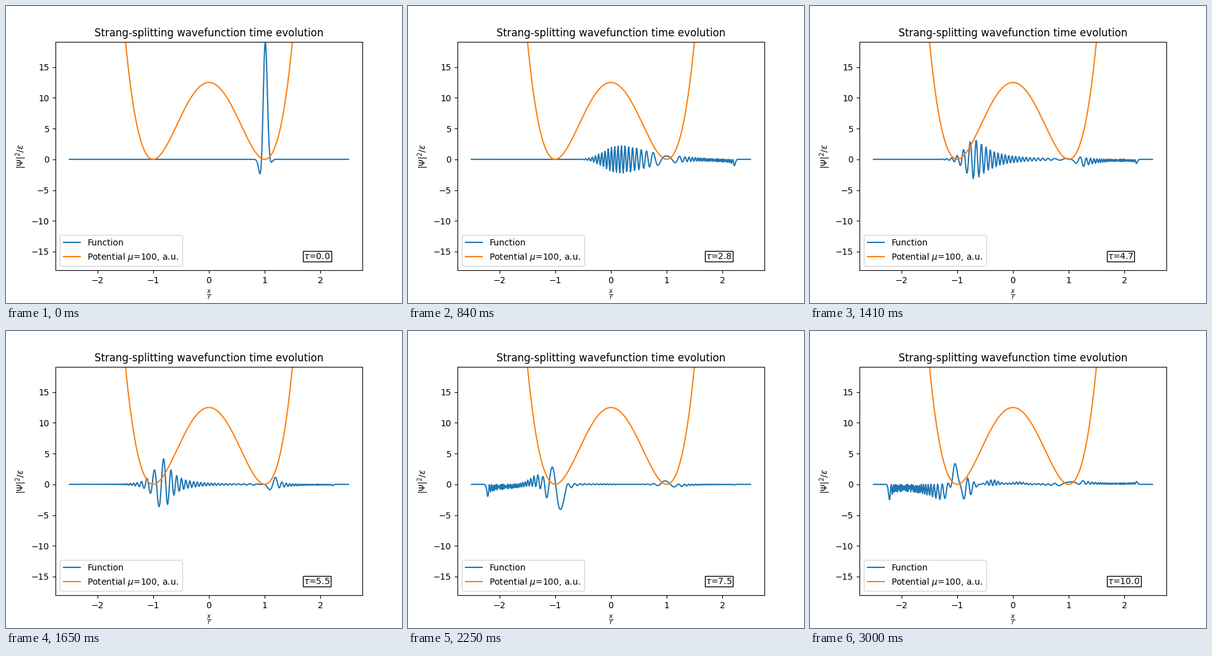
Animation of 640x480 px, one loop 3.03 s. Source, as a matplotlib script:

```python
import numpy as np
import matplotlib.pyplot as plt
from matplotlib.animation import FuncAnimation

MU = 100.0          # reduced mass, also the barrier scale
DX = 0.01
STEP = 0.001        # the first picture is taken after one time step
TAU_PER_FRAME = 0.1
FRAMES = 101
P0 = 10.0           # initial momentum
PEAK = 19.94        # peak density of the initial packet
Y_MIN, Y_MAX = -18.05, 19.14

plt.rcParams["font.family"] = "DejaVu Sans"

x = np.linspace(-2.5, 2.5, 501)
potential = MU / 8 * (x**2 - 1)**2

# Lattice Hamiltonian with positive hopping
hop = 1 / (2 * MU * DX**2)
side = np.full(x.size - 1, hop)
H = np.diag(potential + 2 * hop) + np.diag(side, 1) + np.diag(side, -1)
energy, modes = np.linalg.eigh(H)

psi0 = np.sqrt(PEAK) * np.exp(-MU * (x - 1)**2 + 1j * P0 * (x - 1))
coeffs = modes.T @ psi0


def density(tau):
    """Real part of the squared wavefunction at time tau."""
    psi = modes @ (np.exp(-1j * energy * tau) * coeffs)
    return (psi**2).real


def tau_label(tau):
    return rf"$\tau$={tau:.1f}"


fig, ax = plt.subplots(figsize=(6.4, 4.8), dpi=100)
wave, = ax.plot(x, density(STEP), label="Function")
ax.plot(x, potential, label=r"Potential $\mu$=100, a.u.")
clock = ax.text(1.7, -16.2, tau_label(0),
                bbox={"facecolor": "white", "edgecolor": "black", "pad": 1})
ax.set_xlim(-2.75, 2.75)
ax.set_ylim(Y_MIN, Y_MAX)
ax.set_title("Strang-splitting wavefunction time evolution")
ax.set_xlabel(r"$\frac{x}{r}$")
ax.set_ylabel(r"$|\Psi|^2/\epsilon$")
ax.legend(loc="lower left")


def update(i):
    tau = i * TAU_PER_FRAME
    wave.set_ydata(density(tau + STEP))
    clock.set_text(tau_label(tau))
    return wave, clock


anim = FuncAnimation(fig, update, frames=FRAMES, interval=30,
                     repeat=True, repeat_delay=0, blit=False)
plt.show()
```
